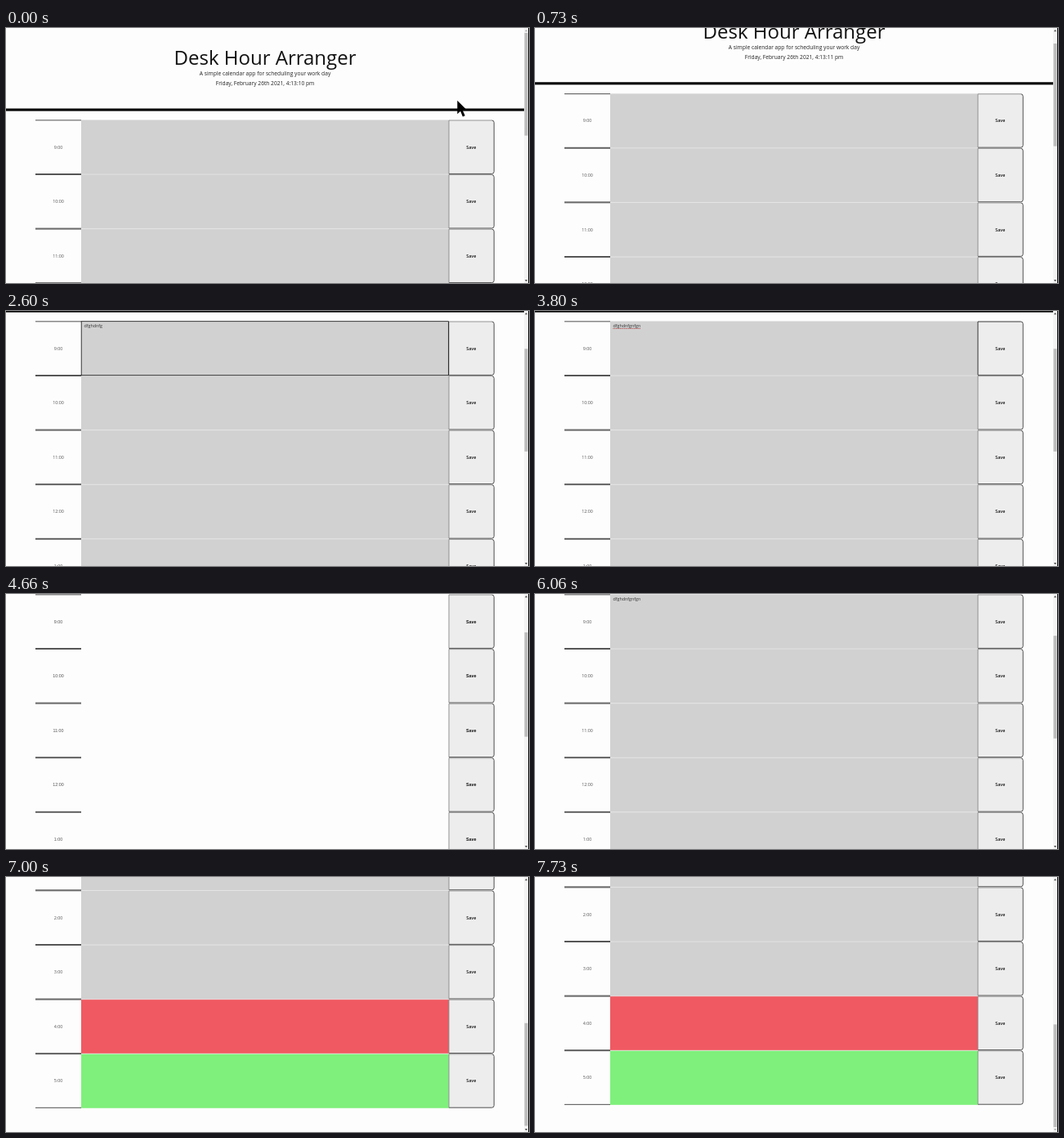
An HTML page for the animation above (8 s loop, 640 by 312 pixels).

```html
<!DOCTYPE html>
<html lang="en">
<head>
<meta charset="utf-8">
<title>Day planner</title>
<style>
  html, body { margin: 0; width: 100%; height: 100%; overflow: hidden; background: #fdfdfd; }
  svg { display: block; font: 5.33px "Open Sans", sans-serif; fill: #222; }
  svg.plain { font-family: "Liberation Sans", sans-serif; }
  .mid { text-anchor: middle; }
  .hour { fill: #555; }
  .save { font-weight: 600; fill: #111; }
  .plain .save { font-weight: 700; }
  .plain .slot, .plain #note { display: none; }
  .edge { fill: none; stroke: #3c3c3c; stroke-width: .9; }
  .light { stroke: #888; }
  .focused .light { stroke: #222; }
</style>
</head>
<body>
<svg id="stage" width="640" height="312" viewBox="0 0 640 312">
  <g id="page">
    <g class="mid" font-size="6.67">
      <text x="317" y="45" font-size="24" fill="#111">Desk Hour Arranger</text>
      <text x="317" y="58.4">A simple calendar app for scheduling your work day</text>
      <text x="317" y="70.4" id="clock"></text>
    </g>
    <rect y="98.5" width="634" height="3.1" fill="#000"/>
    <g id="rows"></g>
    <rect id="ring" x="92.2" y="112.7" width="449.4" height="66" fill="none" stroke="#111" stroke-width=".8"/>
    <text id="note" x="95.5" y="120.4" fill="#333"></text>
    <path id="squiggle" d="M95.5 121.5H129.5" stroke="#a33" stroke-width=".7" stroke-dasharray="1.2 .5"/>
  </g>
  <rect x="634" width="5" height="312" fill="#f3f3f3"/>
  <rect id="thumb" x="634.5" width="4" fill="#bdbdbd"/>
  <path id="up" d="M635 4.2L636.5 2L638 4.2Z"/>
  <path id="down" d="M635 308L636.5 310.2L638 308Z"/>
  <rect x="639" width="1" height="312" fill="#111"/>
  <path id="arrow" d="M.3 .8V17.3L4.1 13.8L6.9 20.4L9.7 19.2L6.8 12.8H12.3Z" fill="#000"/>
  <path id="beam" d="M206 67H209L210 68L211 67H214M210 68V82M206 83H209L210 82L211 83H214" fill="none" stroke="#222"/>
</svg>
<script>
const $ = id => document.getElementById(id);
const ROW = 66.6, TOP = 112.4, PAGE = 745, VIEW = 312, MAX = PAGE - VIEW;
const STEP = 200 / 3, LOOP = 8000, NOTCH = 100 / 3;
const RELOAD = 4660, FONT_SHIFT = 12;

const slotColor = i => i < 7 ? '#d1d1d1' : i === 7 ? '#f05961' : '#7ef07b';

$('rows').innerHTML = Array.from({ length: 9 }, (_, i) => `
  <g id="row${i}" transform="translate(0 ${TOP + i * ROW})">
    <path d="M36 .45H92M36 66.15H92" class="edge"/>
    <text x="64" y="35.2" class="mid hour">${(i + 8) % 12 + 1}:00</text>
    <g class="slot">
      <rect x="92" width="450" height="${ROW}" fill="${slotColor(i)}"/>
      <path d="M92 .1H542" stroke="#e8e8e8" stroke-width=".8"/>
    </g>
    <path d="M542 .6H594.5Q597.2 .6 597.2 3.3V63.3Q597.2 66 594.5 66H542Z" fill="#ededed"/>
    <path d="M594.5 .6Q597.2 .6 597.2 3.3V63.3Q597.2 66 594.5 66H542" class="edge"/>
    <path d="M542 66V.6H594.5" class="edge light"/>
    <text x="569.3" y="35.2" class="mid save">Save</text>
  </g>`).join('');

const clamp = k => Math.max(0, Math.min(1, k));
const mix = (a, b, k) => a + (b - a) * k;
const ease = k => k < .5 ? 4 * k ** 3 : 1 - 4 * (1 - k) ** 3;
const show = (id, on) => $(id).style.display = on ? '' : 'none';

// Each turn of the wheel scrolls by whole notches; late fonts push the page down
function scrollAt(t) {
  const wheel = (start, duration, notches) =>
    NOTCH * notches * ease(clamp((t - start) / duration));
  const y = wheel(470, 330, 1) + wheel(1200, 228, 2) + wheel(6060, 580, 8) + wheel(6800, 330, 2);
  return Math.min(MAX, y + (t >= RELOAD ? FONT_SHIFT : 0));
}

function movePointer(t) {
  const leaving = t < 260;
  show('arrow', leaving || t >= 2800 && t < 3600);
  const k = leaving ? t / 200 : 1 - Math.exp((2800 - t) / 40);
  const [x, y] = leaving
    ? [mix(552, 545, k), mix(88, 47, k)]
    : [mix(585, 558, k), mix(113, 44, k)];
  $('arrow').setAttribute('transform', `translate(${x} ${y})`);
}

function moveThumb(scroll, shift) {
  const height = PAGE - shift;
  $('thumb').setAttribute('y', 6 + 300 * (scroll - shift) / height);
  $('thumb').setAttribute('height', 300 * VIEW / height);
  $('up').setAttribute('fill', scroll > 0 ? '#444' : '#aaa');
  $('down').setAttribute('fill', scroll < MAX ? '#444' : '#aaa');
}

function render(time) {
  const t = Math.floor((time + 7) / STEP) * STEP;
  const between = (a, b) => t >= a && t < b;
  const scroll = scrollAt(t);

  $('page').setAttribute('transform', `translate(0 ${-scroll})`);
  $('stage').setAttribute('class', between(RELOAD, 4730) ? 'plain' : '');
  $('row0').setAttribute('class', between(3330, RELOAD) ? 'focused' : '');
  $('clock').textContent = `Friday, February 26th 2021, 4:13:${10 + Math.floor((t + 800) / 1000)} pm`;

  const typed = t < 2060 ? 0 : Math.floor(mix(2, 12, clamp((t - 2060) / 800)));
  $('note').textContent = 'dfghdnfgnfgn'.slice(0, typed);
  show('ring', between(1730, 3330));
  show('squiggle', between(3800, RELOAD));
  show('beam', between(5530, 5600));

  moveThumb(scroll, between(RELOAD, 4800) ? FONT_SHIFT : 0);
  movePointer(t);
}

function tick() {
  render(performance.now() % LOOP);
  requestAnimationFrame(tick);
}
tick();
</script>
</body>
</html>
```
